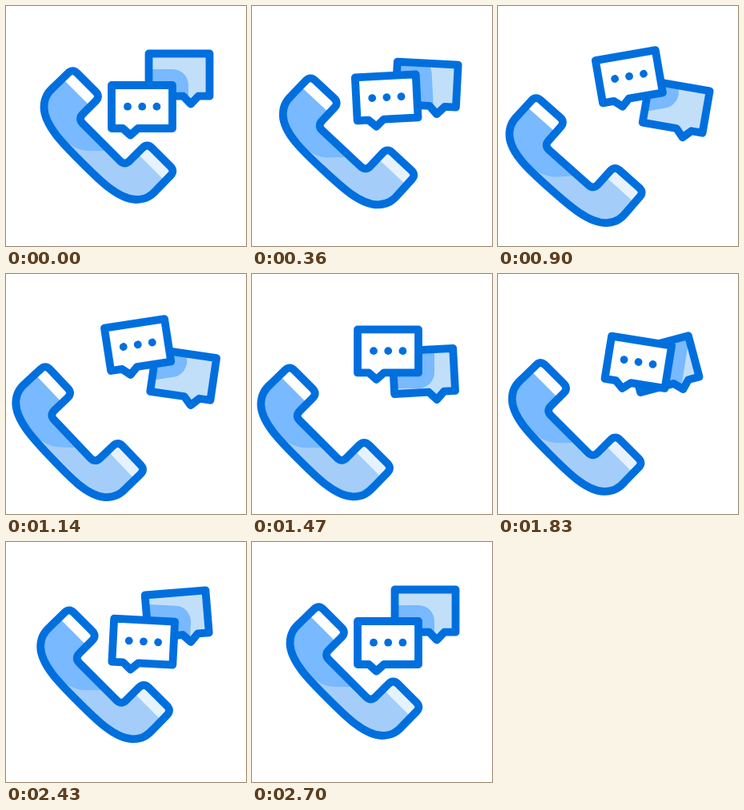
An HTML page for the animation above (2880 ms loop, 300 by 300 pixels).

```html
<!DOCTYPE html>
<html lang="en">
<head>
<meta charset="utf-8">
<title>Call and chat</title>
<style>
  html, body { margin: 0; height: 100%; overflow: hidden; background: #fff; }
  svg { display: block; width: 100%; height: 100%; }
  .line { fill: none; stroke: #006fde; stroke-width: 9.8; stroke-linejoin: round; }
  .dots { fill: #006fde; }
  .shade { fill: #78b9ff; stroke: #78b9ff; stroke-width: 40; stroke-linejoin: round; }
</style>
</head>
<body>
<svg viewBox="0 0 300 300">
  <defs>
    <path id="handset" d="M78 83.5Q83.5 78.5 89 84L112 107Q118 113 112 119L96 135Q90 141 96 147
      L142.5 193.5Q148.5 199.5 154.5 193.5L170.5 177.5Q176.5 171.5 182.5 177.5L205.5 200.5
      Q211 206 206 211.5L188.5 229.5C181.5 237.5 174.5 242 162.5 242
      C140.5 241.5 117.5 218.5 94.3 195.2C71 172 48 149 47.5 127C47.5 115 52 108 60 101Z"/>
    <path id="frontShape" d="M132 99H208V153H165L155.5 161.5L146 153H132Z"/>
    <path id="backShape" d="M178.5 59.5H254.5V112.7H240.5L231 122.5L221.5 112.7H178.5Z"/>
    <clipPath id="inHandset"><use href="#handset"/></clipPath>
    <clipPath id="inBack"><use href="#backShape" class="back"/></clipPath>
  </defs>

  <g class="phone">
    <g clip-path="url(#inHandset)">
      <path fill="#a4cef9" d="M30 60H230V260H30Z"/>
      <path fill="#78b9ff" d="M30 60H130V181H105C90 181 78 174 66 160L30 150Z"/>
      <path fill="#fff" d="M50 70L130 150V70Z"/>
      <path fill="#e6f3ff" d="M140 160L230 250V160Z"/>
    </g>
    <use href="#handset" class="line"/>
  </g>

  <use href="#backShape" class="back" fill="#c2dff9"/>
  <g clip-path="url(#inBack)">
    <path class="front shade" d="M132 99H208V152.5H132Z"/>
  </g>
  <use href="#backShape" class="back line"/>

  <g class="front">
    <use href="#frontShape" fill="#fff"/>
    <use href="#frontShape" class="line"/>
    <g class="dots">
      <circle cx="152" cy="125.7" r="4.9"/>
      <circle cx="170.2" cy="125.7" r="4.9"/>
      <circle cx="188.4" cy="125.7" r="4.9"/>
    </g>
  </g>
</svg>
<script>
  const LOOP = 2880, END = 2700;

  // Each key is [time, value]; values are eased in and out between keys.
  const slide = [[0, 0], [1190, 36.3], [1500, 36.3], [END, 0]];
  const ring = [[0, 0], [400, -2], [690, -2], [950, -3.5], [1080, 4.5], [1180, 0], [END, 0]];
  const swap = [[0, 0], [980, 1], [END, 0]];
  const frontTilt = [[0, 0], [980, -10], [1960, 10], [END, 0]];
  const backTilt = [[0, 0], [980, 10], [1960, -16], [END, 0]];

  function valueAt(keys, t) {
    const i = Math.max(1, keys.findIndex(key => key[0] >= t));
    const [t0, v0] = keys[i - 1], [t1, v1] = keys[i];
    return v0 + (v1 - v0) * (1 - Math.cos(Math.PI * (t - t0) / (t1 - t0))) / 2;
  }

  function place(name, dx, dy, angle, pivot) {
    const transform = `translate(${dx} ${dy}) rotate(${angle} ${pivot})`;
    for (const part of document.querySelectorAll("." + name)) part.setAttribute("transform", transform);
  }

  function draw(now) {
    const t = Math.min(now % LOOP, END);
    const shift = valueAt(slide, t), lift = valueAt(swap, t);
    place("phone", -shift, shift, valueAt(ring, t), "127 161");
    place("front", 0, -36.4 * lift, valueAt(frontTilt, t), "155.5 160.5");
    place("back", 0, 42.5 * lift, valueAt(backTilt, t), "231 121");
    requestAnimationFrame(draw);
  }
  draw(0);
</script>
</body>
</html>
```
